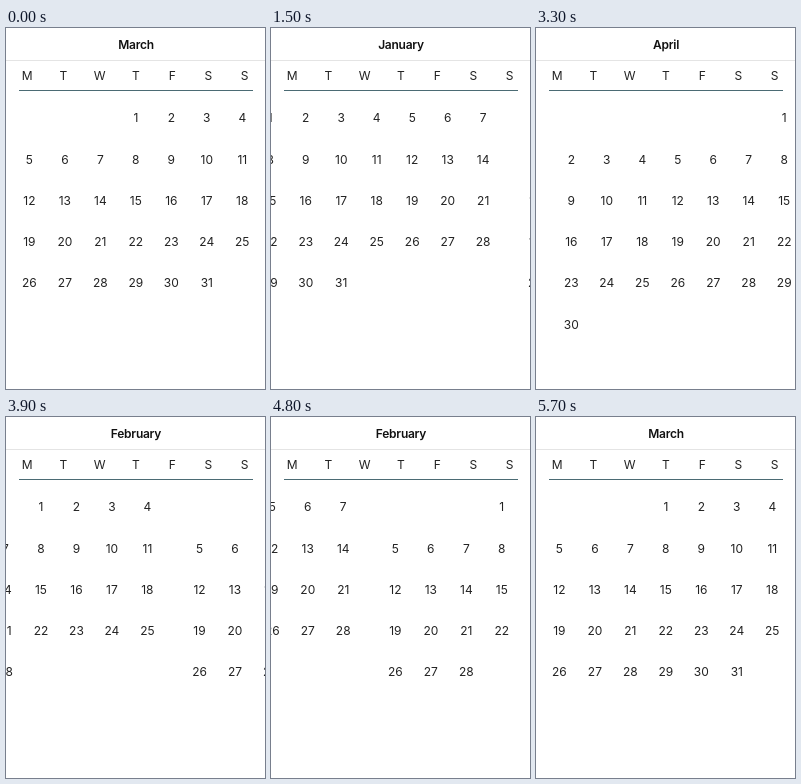
An HTML page that plays this animation: 259 px wide and 361 px high, repeating every 6.2 s.

```html
<!DOCTYPE html>
<html lang="en">
<head>
<meta charset="utf-8">
<title>Calendar</title>
<style>
  html, body { margin: 0; width: 100%; height: 100%; overflow: hidden; background: #fff; }
  svg { display: block; width: 100vw; height: 100vh; }
  text { font: 400 12px Inter, Roboto, sans-serif; fill: #222; text-anchor: middle; }
  #title { font-weight: 600; letter-spacing: -.25px; fill: #111; }
</style>
</head>
<body>
<svg id="stage" viewBox="0 0 259 361">
  <text id="title" x="130" y="21.3"></text>
  <path d="M0 32.5H259" stroke="#e4e4e4"/>
  <g id="week"></g>
  <path d="M13 62.5H247" stroke="#4b6b74"/>
  <g id="pages"></g>
</svg>
<script>
const LOOP = 6200, TICK = 100, PITCH = 265;
const JAN = 0, FEB = 1, MAR = 2, APR = 3;

// start: column of the first day, counted from Monday
const months = [
  { name: 'January', start: 0, days: 31 },
  { name: 'February', start: 3, days: 28 },
  { name: 'March', start: 3, days: 31 },
  { name: 'April', start: 6, days: 30 }
];

// Finger swipes: a short drag, then the page settles; progress per tick
const swipes = [
  { at: 600, to: FEB, path: [.03, .3, .7, .95, 1] },
  { at: 1300, to: JAN, path: [.045, .64, .909, 1] },
  { at: 1800, to: FEB, path: [.5, .93, 1] },
  { at: 2200, to: MAR, path: [.1, .7, .955, 1] },
  { at: 2700, to: APR, path: [.045, .6, .955, 1] },
  { at: 3300, to: MAR, path: [.045, .68, .95, 1] },
  { at: 3800, to: FEB, path: [.045, .642, .95, 1] },
  { at: 4300, to: JAN, path: [.4, .9, 1] },
  { at: 4700, to: FEB, path: [.045, .619, .95, 1] },
  { at: 5300, to: MAR, path: [.03, .3, .7, .95, 1] }
];

const byId = id => document.getElementById(id);
const title = byId('title');

function add(parent, tag, attrs = {}, text = '') {
  const node = document.createElementNS('http://www.w3.org/2000/svg', tag);
  for (const key in attrs) node.setAttribute(key, attrs[key]);
  node.textContent = text;
  parent.appendChild(node);
  return node;
}

[...'MTWTFSS'].forEach((d, i) => add(byId('week'), 'text', { x: 21.2 + i * 36.25, y: 52.1 }, d));

const pages = months.map(({ start, days }) => {
  const page = add(byId('pages'), 'g');
  for (let day = 1; day <= days; day++) {
    const cell = start + day - 1;
    add(page, 'text', {
      x: 23.4 + (cell % 7) * 35.48,
      y: 94.4 + Math.floor(cell / 7) * 41.25
    }, day);
  }
  return page;
});

function position(time) {
  let pos = MAR;
  for (const { at, to, path } of swipes) {
    if (time < at) break;
    const step = Math.min(Math.floor((time - at) / TICK), path.length - 1);
    pos += (to - pos) * path[step];
  }
  return pos;
}

function draw(time) {
  const pos = position(time);
  title.textContent = months[Math.round(pos)].name;
  pages.forEach((page, i) => page.setAttribute('transform', `translate(${(i - pos) * PITCH} 0)`));
}

function frame() {
  draw(performance.now() % LOOP);
  requestAnimationFrame(frame);
}
frame();
</script>
</body>
</html>
```
